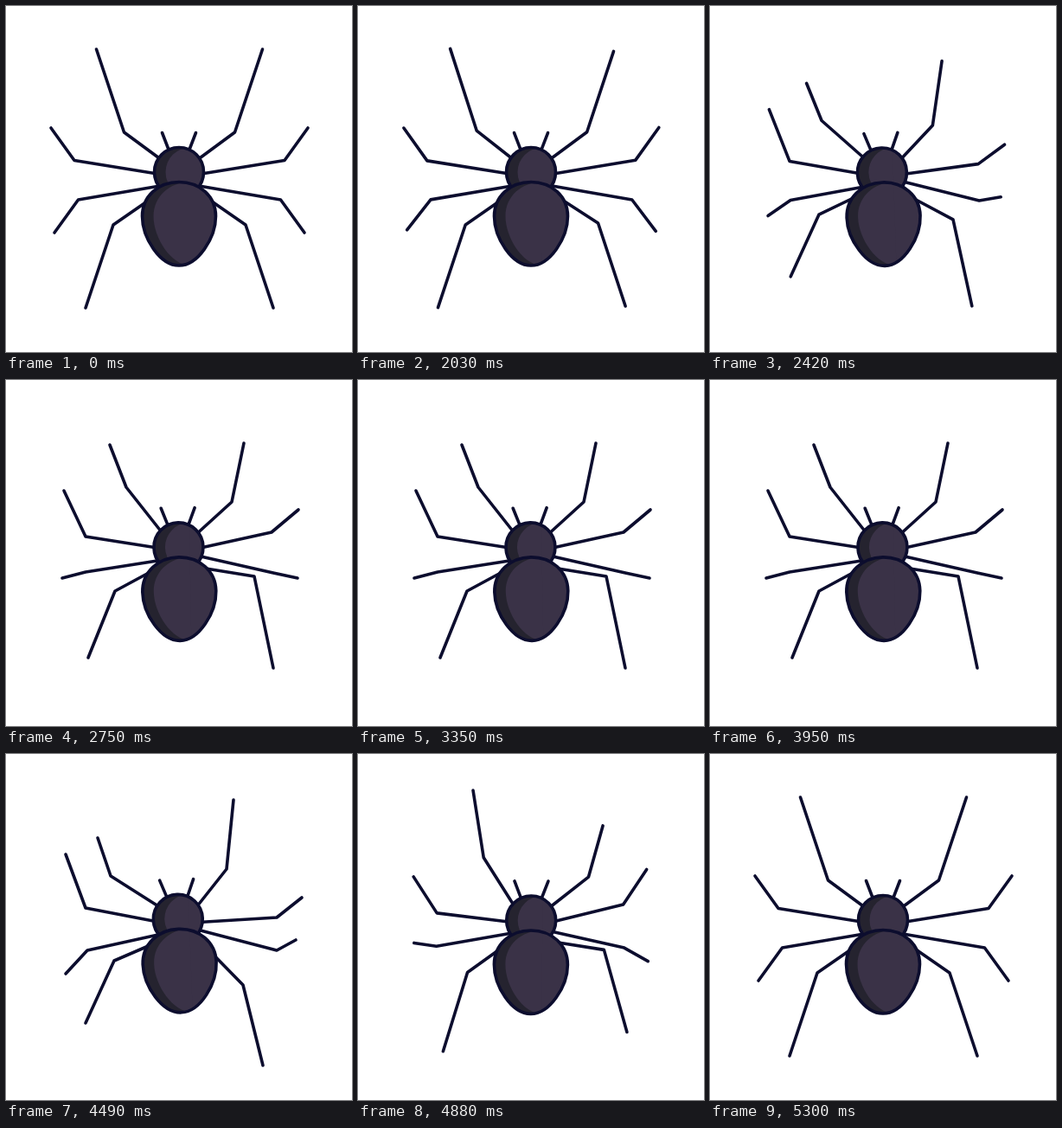
Recreate the animation shown at these times as an HTML page with a canvas. Size 400 by 400 pixels, loop 5.33 s.

```html
<!DOCTYPE html>
<html lang="en">
<head>
<meta charset="utf-8">
<title>Crawling spider</title>
<style>
  html, body { margin: 0; width: 100%; height: 100%; overflow: hidden; background: #fff; }
  canvas { display: block; width: 400px; height: 400px; }
</style>
</head>
<body>
<canvas id="stage" width="400" height="400"></canvas>
<script>
const ctx = document.getElementById('stage').getContext('2d');
const INK = '#0c0d2e', SKIN = '#3a3247', SHADE = '#25232f';

const LOOP = 5330, START = 2000, STEP = 30;
const CYCLE = 300, EASE = 180, CRAWL = 3300;

// Left-side legs, front to back; each pose is knee x, y, tip x, y.
const KEY_TIMES = [0, 60, 90, 150, 195, 240];
const LEGS = [
  { hip: [184, 181], rest: [136.5, 146, 104.5, 50], keys: [
    [140, 141, 126, 73], [128, 142, 110, 92], [121, 141, 106, 97],
    [139, 124, 120, 75], [147, 120, 138, 31], [146, 133, 138, 53]] },
  { hip: [178, 194.5], rest: [79, 178.5, 52, 141], keys: [
    [92, 181, 67, 128], [90, 187, 61, 157], [88, 189, 59, 166],
    [94, 176, 63, 150], [94, 174, 69, 126], [92, 178, 69, 116]] },
  { hip: [178, 208], rest: [83.5, 224, 56, 262], keys: [
    [92, 223, 64, 229], [94, 226, 68, 250], [94, 227, 69, 254],
    [92, 222, 65, 229], [90, 223, 65, 215], [88, 227, 66, 215]] },
  { hip: [176, 217], rest: [124, 253, 92, 349], keys: [
    [126, 244, 95, 321], [127, 262, 102, 366], [127, 267, 104, 360],
    [114, 227, 92, 333], [119, 229, 90, 317], [125, 239, 92, 311]] }
];

const mix = (a, b, w) => a + (b - a) * w;
const smooth = x => x * x * (3 - 2 * x);
const wrap = t => ((t % CYCLE) + CYCLE) % CYCLE;

// Closed Hermite spline through the poses of one stride.
function stride(keys, time) {
  const t = wrap(time), n = keys.length;
  let i = n - 1;
  while (KEY_TIMES[i] > t) i--;
  const at = k => KEY_TIMES[(k + n) % n] + Math.floor(k / n) * CYCLE;
  const key = k => keys[(k + n) % n];
  const span = at(i + 1) - at(i), u = (t - at(i)) / span;
  return keys[0].map((_, c) => {
    const slope = k => (key(k + 1)[c] - key(k - 1)[c]) / (at(k + 1) - at(k - 1));
    const bend = u * (1 - u) * span;
    return mix(key(i)[c], key(i + 1)[c], smooth(u))
      + bend * ((1 - u) * slope(i) - u * slope(i + 1));
  });
}

// Gait phase and how far the pose is from rest.
function gait(time) {
  const t = Math.floor((time - START) / STEP) * STEP;
  if (t <= 0 || t >= CRAWL) return { phase: 0, weight: 0 };
  return {
    phase: Math.min(Math.max(t, EASE), CRAWL - EASE),
    weight: smooth(Math.min(1, t / EASE, (CRAWL - t) / EASE))
  };
}

function line(points) {
  ctx.beginPath();
  points.forEach(([x, y]) => ctx.lineTo(x, y));
  ctx.stroke();
}

function drawLeg(leg, row, side, { phase, weight }) {
  const time = phase + ((row + side) % 2 ? CYCLE / 2 : 0);
  const walk = stride(leg.keys, time);
  const [kx, ky, tx, ty] = leg.rest.map((v, c) => mix(v, walk[c], weight));
  let [hx, hy] = leg.hip;
  if (row === 2) {
    hy += weight * (3.1 * Math.cos((time / CYCLE - 0.4) * 2 * Math.PI) - 2);
  }
  const flip = x => side ? 401 - x : x;
  line([[flip(hx), hy], [flip(kx), ky], [flip(tx), ty]]);
}

function shaded(shape) {
  ctx.fillStyle = SHADE;
  ctx.fill(shape);
  ctx.save();
  ctx.clip(shape);
  ctx.translate(13, 0);
  ctx.fillStyle = SKIN;
  ctx.fill(shape);
  ctx.fillRect(200, 150, 60, shape === head ? 80 : 160);
  ctx.restore();
  ctx.stroke(shape);
}

const head = new Path2D();
head.arc(200, 192, 28.5, 0, Math.PI * 2);
const abdomen = new Path2D(
  'M200 203.5C224 203.5 242.5 220 242.5 243C242.5 268 222 300 200 300' +
  'C178 300 157.5 268 157.5 243C157.5 220 176 203.5 200 203.5Z');

function drawBody({ phase, weight }) {
  const a = phase / CYCLE * 2 * Math.PI;
  ctx.save();
  ctx.translate(200, 225 + weight * 1.4 * Math.cos(2 * a));
  ctx.rotate(weight * (0.017 * Math.cos(a) - 0.033 * Math.sin(a)));
  ctx.translate(-200, -225);
  line([[180.5, 146.5], [188, 166]]);
  line([[219.5, 146.5], [212, 166]]);
  shaded(head);
  shaded(abdomen);
  ctx.restore();
}

function draw(time) {
  const state = gait(time);
  ctx.fillStyle = '#fff';
  ctx.fillRect(0, 0, 400, 400);
  ctx.strokeStyle = INK;
  ctx.lineWidth = 3.6;
  ctx.lineCap = ctx.lineJoin = 'round';
  LEGS.forEach((leg, row) => [0, 1].forEach(side => drawLeg(leg, row, side, state)));
  drawBody(state);
}

const begin = performance.now();
function tick() {
  draw((performance.now() - begin) % LOOP);
  requestAnimationFrame(tick);
}
tick();
</script>
</body>
</html>
```
